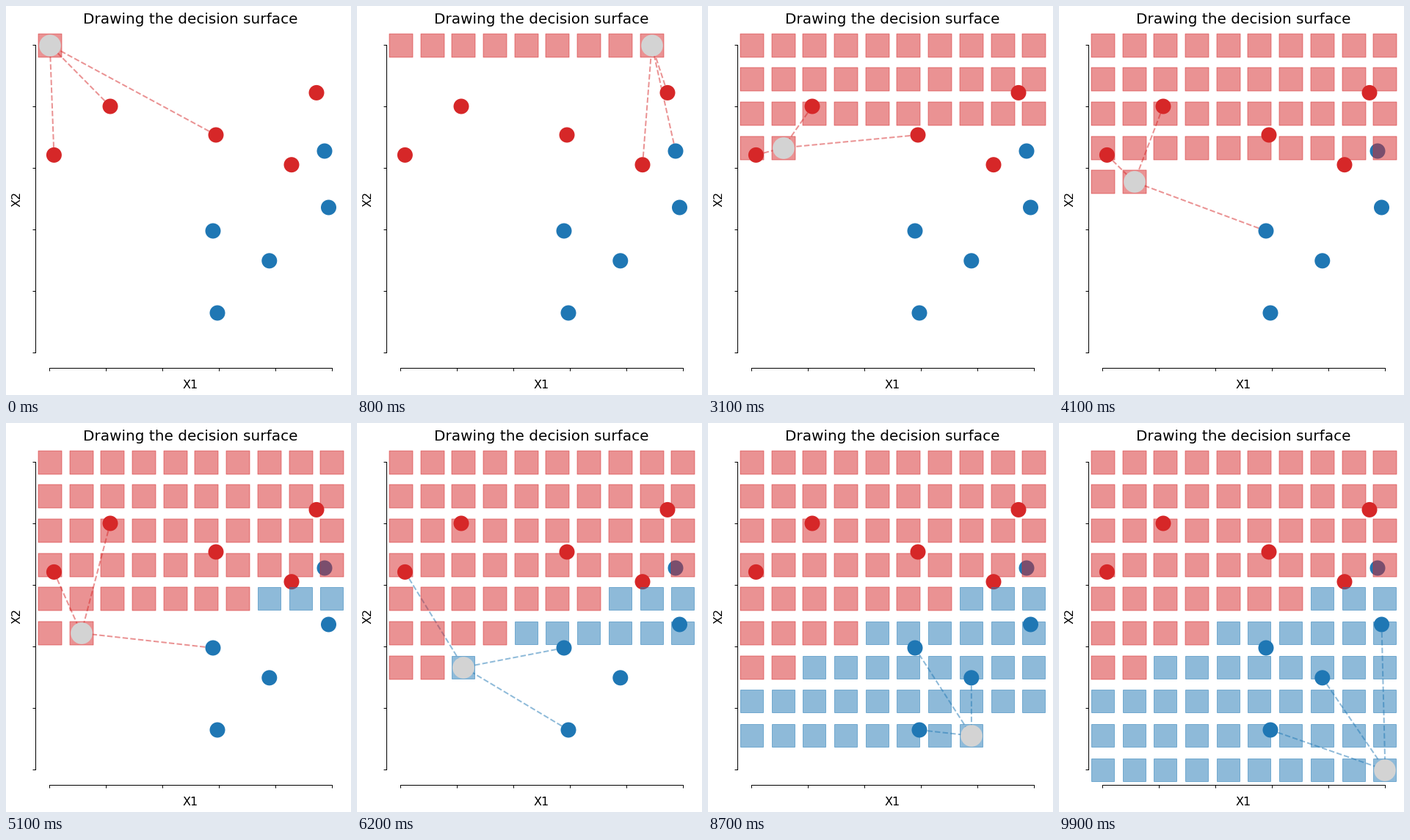
A matplotlib script for the animation above (10000 ms loop, 470 by 531 pixels).

```python
import numpy as np
import matplotlib.pyplot as plt
from matplotlib.animation import FuncAnimation
from matplotlib.patches import Circle, Rectangle

W, H, DPI = 470, 531, 72          # at 72 dpi one point is one pixel
GRID, K, INTERVAL = 10, 3, 100
LEFT, RIGHT, TOP, BOTTOM = 59.8, 444.4, 53.5, 473.5
AXIS_X, AXIS_Y, TICK = 40.5, 494.5, 4
RED, BLUE = "tab:red", "tab:blue"

# Training points in pixels, with their class colours
points = np.array([
    (142, 137), (65.4, 203.4), (286, 176), (389, 216.7), (423, 118.4),
    (434, 198), (439.5, 275), (282, 307), (358.8, 347.8), (288, 419),
])
labels = np.array([0] * 5 + [1] * 5)
colors = (RED, BLUE)

plt.rcParams["font.family"] = "DejaVu Sans"
fig = plt.figure(figsize=(W / DPI, H / DPI), dpi=DPI, facecolor="white")
ax = fig.add_axes([0, 0, 1, 1])
ax.set(xlim=(0, W), ylim=(H, 0))
ax.axis("off")


def stroke(x, y, cap="butt"):
    ax.plot(x, y, color="black", lw=1, solid_capstyle=cap, snap=False)


def draw_axes():
    xs = np.floor(np.linspace(LEFT, RIGHT, 6)) + 0.5
    ys = np.floor(np.linspace(TOP, BOTTOM, 6)) + 0.5
    stroke((AXIS_X, AXIS_X), (ys[0], ys[-1]), "projecting")
    stroke((xs[0], xs[-1]), (AXIS_Y, AXIS_Y), "projecting")
    for x, y in zip(xs, ys):
        stroke((AXIS_X - TICK, AXIS_X), (y, y))
        stroke((x, x), (AXIS_Y, AXIS_Y + TICK))
    ax.text(251.3, 24, "Drawing the decision surface", size=20, ha="center")
    ax.text(251.5, 522, "X1", size=16, ha="center")
    ax.text(19.5, 263.5, "X2", size=16, ha="center", rotation=90,
            rotation_mode="anchor")


def nearest(query):
    """Indices of the K closest points, in normalised units."""
    d = (points - query) / (RIGHT - LEFT, BOTTOM - TOP)
    return np.argsort(np.hypot(*d.T))[:K]


def make_square(center, label):
    x, y = center
    half = (16, 15.5)[label]
    square = Rectangle((x - half, y - half), 2 * half, 2 * half,
                       color=colors[label], alpha=0.5, lw=1, zorder=4,
                       snap=False, visible=False)
    return ax.add_patch(square)


draw_axes()
for point, label in zip(points, labels):
    ax.add_patch(Circle(point, 10.5, fc=colors[label], lw=0, zorder=3))

queries = np.array([(x, y) for y in np.linspace(TOP, BOTTOM, GRID)
                    for x in np.linspace(LEFT, RIGHT, GRID)])
centers = np.floor(queries + 0.5)  # markers sit on whole pixels
neighbors = [nearest(q) for q in queries]
classes = [int(labels[n].sum() > K / 2) for n in neighbors]
squares = [make_square(c, label) for c, label in zip(centers, classes)]
links = [ax.plot([], [], "--", lw=2, alpha=0.5, zorder=2)[0] for _ in range(K)]
probe = ax.add_patch(Circle(centers[0], 14.8, fc="lightgray", lw=0, zorder=5))


def update(i):
    for j, square in enumerate(squares):
        square.set_visible(j <= i)
    qx, qy = queries[i]
    for link, n in zip(links, neighbors[i]):
        px, py = points[n]
        link.set_data((px, qx), (py, qy))
        link.set_color(colors[classes[i]])
    probe.center = centers[i]
    return [*squares, *links, probe]


anim = FuncAnimation(fig, update, frames=GRID * GRID, interval=INTERVAL,
                     repeat=True, repeat_delay=0, blit=False)
plt.show()
```
